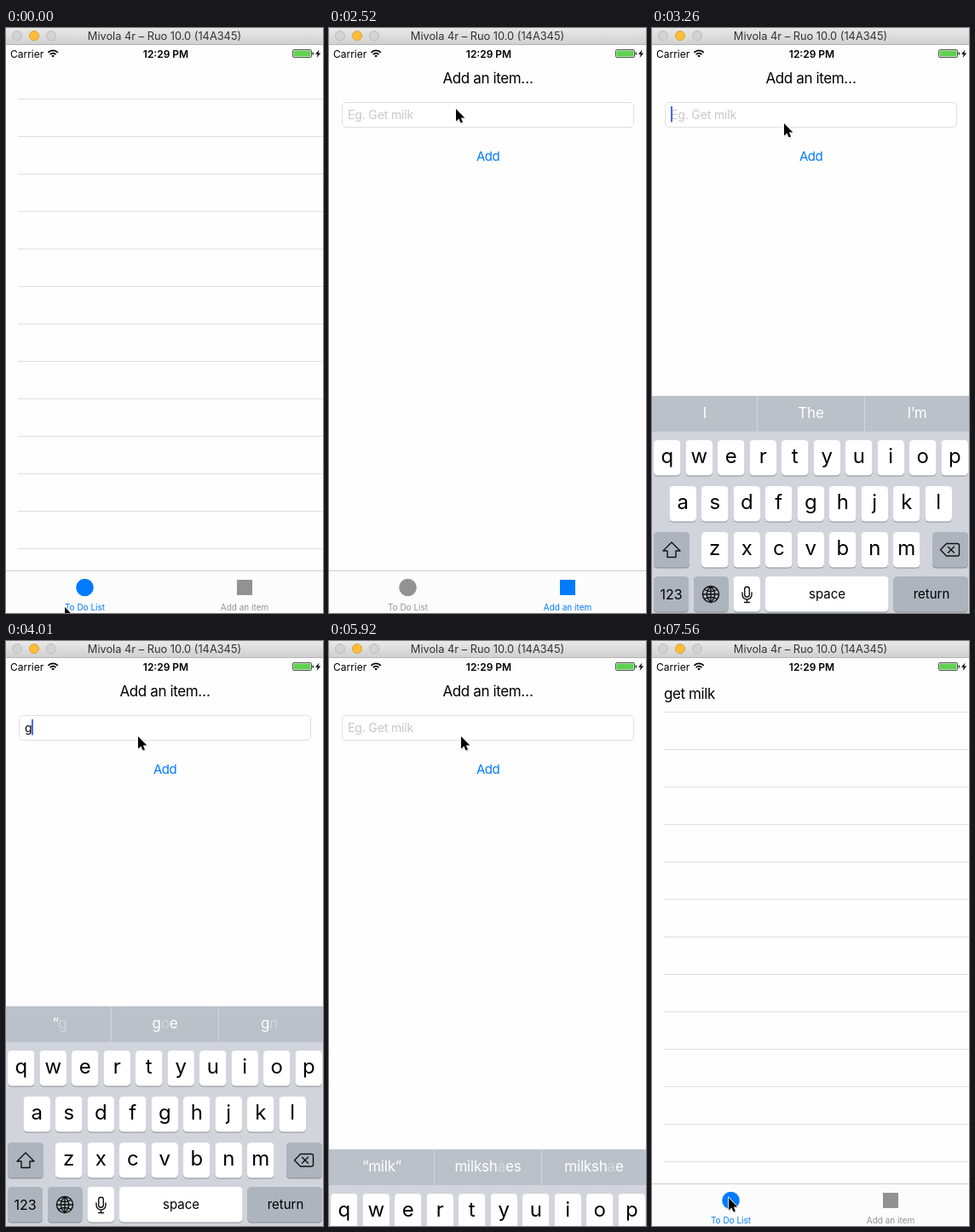
An HTML page that plays this animation: 372x687 px, repeating every 8 s.

```html
<!DOCTYPE html>
<html lang="en">
<head>
<meta charset="utf-8">
<title>To do list</title>
<style>
html, body { margin: 0; width: 100%; height: 100%; overflow: hidden; background: #fefefe; }
svg { display: block; width: 372px; height: 687px; font-family: Inter, Roboto, sans-serif; }
text { white-space: pre; }
.mid { text-anchor: middle; }
.body { font-size: 17px; letter-spacing: -.4px; }
.field { font-size: 14px; letter-spacing: -.15px; }
.hint { font-size: 17px; letter-spacing: -.2px; fill: #fff; }
.line { fill: none; stroke: #111; stroke-width: 1.4; stroke-linejoin: round; stroke-linecap: round; }
</style>
</head>
<body>
<svg id="stage" viewBox="0 0 372 687" xmlns="http://www.w3.org/2000/svg"></svg>
<script>
const LOOP = 8000, TICK = 148.2;
const BLUE = '#007aff', GREY = '#929292';

// Each row: first tick, then the values that hold from there.
const cursorSteps = [
  [0, 69, 680], [3, 75, 666], [4, 116, 604], [5, 185, 562], [6, 258, 596], [7, 291, 643], [8, 288, 656],
  [13, 284, 600], [14, 245, 380], [15, 190, 160], [16, 150, 67], [17, 149, 95], [18, 155, 112],
  [41, 152, 122], [42, 138, 185], [43, 112, 300], [44, 74, 440], [45, 48, 549],
  [46, 43, 590], [47, 62, 632], [48, 92, 655], [49, 90, 654]
];
const keyboardSteps = [
  [0, 258], [20, 115], [21, 22], [22, 3], [23, 0], [39, 24], [40, 168], [41, 242], [42, 258]
];
const typeSteps = [
  [0, ''], [27, 'g'], [28, 'ge'], [30, 'get'], [32, 'get '], [34, 'get m'],
  [35, 'get mi'], [36, 'get mil'], [37, 'get milk'], [39, '']
];
// Letters between tildes are still fading in.
const hintSteps = [
  [0, '“foo~d', 'foo~d', 'foodst~uf', 5, 0, 6],
  [21, 'I', 'The', 'I’m'],
  [27, '“~g', 'g~o~e', 'g~n', 1, 0, -2],
  [28, '“ge”', 'get', 'g~e~t'],
  [30, '“get”', 'get', 'gets'],
  [32, 'the', 'a', 'my'],
  [34, '“m”', 'me', 'my'],
  [35, '“mi”', 'mi~r~e', 'minu~t', 0, 0, 1],
  [36, '“mil”', 'milk', 'miles'],
  [37, '“mil~k~”', 'milk', 'million'],
  [39, '“milk”', 'milksh~a~es', 'milksh~a~e']
];

const at = (steps, tick) => steps.reduce((hit, row) => row[0] <= tick ? row : hit).slice(1);
const text = (x, y, size, str, attrs = '') => `<text x="${x}" y="${y}" font-size="${size}" ${attrs}>${str}</text>`;
const rect = (x, y, w, h, fill, attrs = '') => `<rect x="${x}" y="${y}" width="${w}" height="${h}" fill="${fill}" ${attrs}/>`;
const dot = (x, y, r, fill, attrs = '') => `<circle cx="${x}" cy="${y}" r="${r}" fill="${fill}" ${attrs}/>`;
const path = (d, attrs = 'class="line"') => `<path d="${d}" ${attrs}/>`;
const mid = 'class="mid"';

function key(x, y, w, fill = '#fff') {
  return rect(x, y + 1, w, 41.5, '#888b91', 'rx="4.5"') + rect(x, y, w, 41.5, fill, 'rx="4.5"');
}

function keyRow(letters, x, y) {
  return [...letters].map((ch, i) => {
    const left = x + i * 37.5;
    return key(left, y, 31.5) + text(left + 15.75, y + 27, 24, ch, mid);
  }).join('');
}

function keyboard() {
  const dark = '#adb4be';
  return rect(0, 429, 372, 258, '#d1d5db') +
    rect(0, 429, 372, 42, '#bac1c9') +
    rect(123, 429, 1, 42, '#d0d5da') + rect(249, 429, 1, 42, '#d0d5da') +
    '<g id="hints"></g>' +
    keyRow('qwertyuiop', 2, 481) + keyRow('asdfghjkl', 20.5, 535) + keyRow('zxcvbnm', 58, 589) +
    key(2, 589, 42, dark) + path('M23 601L33 611H28V618.5H18V611H13Z') +
    key(329, 589, 42, dark) +
    path('M345.5 602.5H358.5a2 2 0 0 1 2 2V615a2 2 0 0 1-2 2H345.5L338.5 609.8ZM347.5 606.3l7 7m0-7l-7 7') +
    key(2, 641, 41, dark) + text(22.5, 667.5, 16, '123', mid) +
    key(49, 641, 40.5, dark) + dot(69, 662, 9.5, 'none', 'class="line"') +
    path('M59.5 662h19M69 652.5v19M61.5 656.5q7.5 4 15 0M61.5 667.5q7.5-4 15 0M69 652.5q-9.5 9.5 0 19q9.5-9.5 0-19') +
    key(95.5, 641, 31.5) +
    path('M108.7 656a2.8 2.8 0 0 1 5.6 0v6.5a2.8 2.8 0 0 1-5.6 0ZM106 660v2.5a5.5 5.5 0 0 0 11 0V660M111.5 668v3.5M108.5 671.5h6') +
    key(133, 641, 144.5) + text(205.5, 667, 15, 'space', mid) +
    key(283.5, 641, 87.5, dark) + text(328, 667, 15, 'return', mid);
}

function chrome() {
  const light = (x, fill, edge) => dot(x, 9, 5.5, fill, `stroke="${edge}"`);
  return `<defs><linearGradient id="bar" x2="0" y2="1">
      <stop stop-color="#e9e9e9"/><stop offset="1" stop-color="#d0d0d0"/></linearGradient></defs>` +
    rect(0, 0, 372, 19, 'url(#bar)') + rect(0, 19, 372, 1, '#b4b4b4') +
    light(13, '#d3d3d3', '#bcbcbc') + light(33, '#fdbd37', '#dfa137') + light(53, '#d3d3d3', '#bcbcbc') +
    text(186, 14, 12.8, 'Mivola 4r – Ruo 10.0 (14A345)', 'class="mid" fill="#333"') +
    text(5, 34.5, 12, 'Carrier') +
    path('M49.4 28.8a8 8 0 0 1 11.4 0M51.7 31.1a4.8 4.8 0 0 1 6.8 0', 'fill="none" stroke="#000" stroke-width="1.7"') +
    path('M55.1 34.6l-1.8-1.9a2.6 2.6 0 0 1 3.6 0Z', '') +
    text(187.5, 34.5, 12, '12:29 PM', 'class="mid" font-weight="600"') +
    rect(336.5, 25.5, 22, 9, '#fff', 'rx="1.5" stroke="#555"') + rect(337.5, 26.5, 20, 7, '#5fd04f') +
    rect(359.5, 28.5, 1.5, 3, '#333') +
    path('M367.5 25.5L363 30.8h2.8L364.6 35L369.2 29.4h-2.9Z', '');
}

function listView() {
  let rows = '';
  for (let y = 83; y < 620; y += 44) rows += rect(14, y, 358, 1, '#dfdfe1');
  return rows + '<text id="item" class="body" x="14" y="67.5">get milk</text>';
}

function addView() {
  return '<text class="body mid" x="186.5" y="64.5">Add an item…</text>' +
    rect(15.5, 87.5, 342, 29, '#fff', 'rx="4.5" stroke="#e0e0e0"') +
    '<text id="empty" class="field" x="22" y="106.5" fill="#c7c7cd">Eg. Get milk</text>' +
    '<text id="typed" class="field" x="22" y="106.5"></text>' +
    rect(22, 92, 2, 18.5, '#426bf2', 'id="caret"') +
    text(186.5, 155.5, 15, 'Add', `class="mid" letter-spacing="-.5" fill="${BLUE}"`);
}

function tabs() {
  return rect(0, 637, 372, 50, '#fcfcfc') + rect(0, 637, 372, 1, '#cfcfd1') +
    `<g id="tabList">${dot(92.5, 657, 10.3)}${text(92.5, 683.5, 10, 'To Do List', mid)}</g>` +
    `<g id="tabAdd">${rect(271, 648, 18, 18)}${text(280, 683.5, 10, 'Add an item', mid)}</g>`;
}

const stage = document.getElementById('stage');
stage.innerHTML = rect(0, 0, 372, 687, '#fefefe') +
  `<g id="list">${listView()}</g><g id="add">${addView()}</g>` + tabs() +
  `<g id="keys">${keyboard()}</g>` + chrome() +
  '<g id="cursor">' +
  path('M1 1.5V16L4.4 12.9L6.6 18L9 17L6.8 12.1H11.3Z', 'opacity=".2"') +
  path('M0 0V14.5L3.4 11.4L5.6 16.6L8 15.6L5.8 10.6H10.3Z', 'stroke="#fff" stroke-width="1.6" paint-order="stroke"') +
  '</g>';

const el = {};
stage.querySelectorAll('[id]').forEach(node => el[node.id] = node);
// Unfilled tab shapes take the colour of their group.
for (const tab of [el.tabList, el.tabAdd])
  for (const part of tab.children) part.removeAttribute('fill');

const show = (node, on) => node.setAttribute('visibility', on ? 'inherit' : 'hidden');
const move = (node, x, y) => node.setAttribute('transform', `translate(${x} ${y})`);

function hints(words) {
  return [62, 186.5, 311].map((x, col) => {
    const spans = words[col].split('~')
      .map((part, i) => `<tspan fill-opacity="${i % 2 ? .35 : 1}">${part}</tspan>`).join('');
    return `<text class="hint mid" x="${x + (words[col + 3] || 0)}" y="455">${spans}</text>`;
  }).join('');
}

function draw(tick) {
  const adding = tick >= 10 && tick < 51;
  show(el.list, !adding);
  show(el.add, adding);
  show(el.item, tick >= 51);
  el.tabList.setAttribute('fill', adding ? GREY : BLUE);
  el.tabAdd.setAttribute('fill', adding ? BLUE : GREY);

  const [typed] = at(typeSteps, tick);
  el.typed.textContent = typed;
  show(el.empty, !typed);
  show(el.caret, tick >= 20 && tick < 39);
  el.caret.setAttribute('x', 22 + (typed ? el.typed.getComputedTextLength() - .5 : 0));

  const [drop] = at(keyboardSteps, tick);
  show(el.keys, drop < 258);
  move(el.keys, 0, drop);
  el.hints.innerHTML = hints(at(hintSteps, tick));
  move(el.cursor, ...at(cursorSteps, tick));
}

const start = performance.now();
let last = -1;
function frame() {
  const t = (performance.now() - start) % LOOP;
  const tick = Math.floor((t + 10) / TICK);
  if (tick !== last) draw(last = tick);
  requestAnimationFrame(frame);
}
frame();
</script>
</body>
</html>
```
